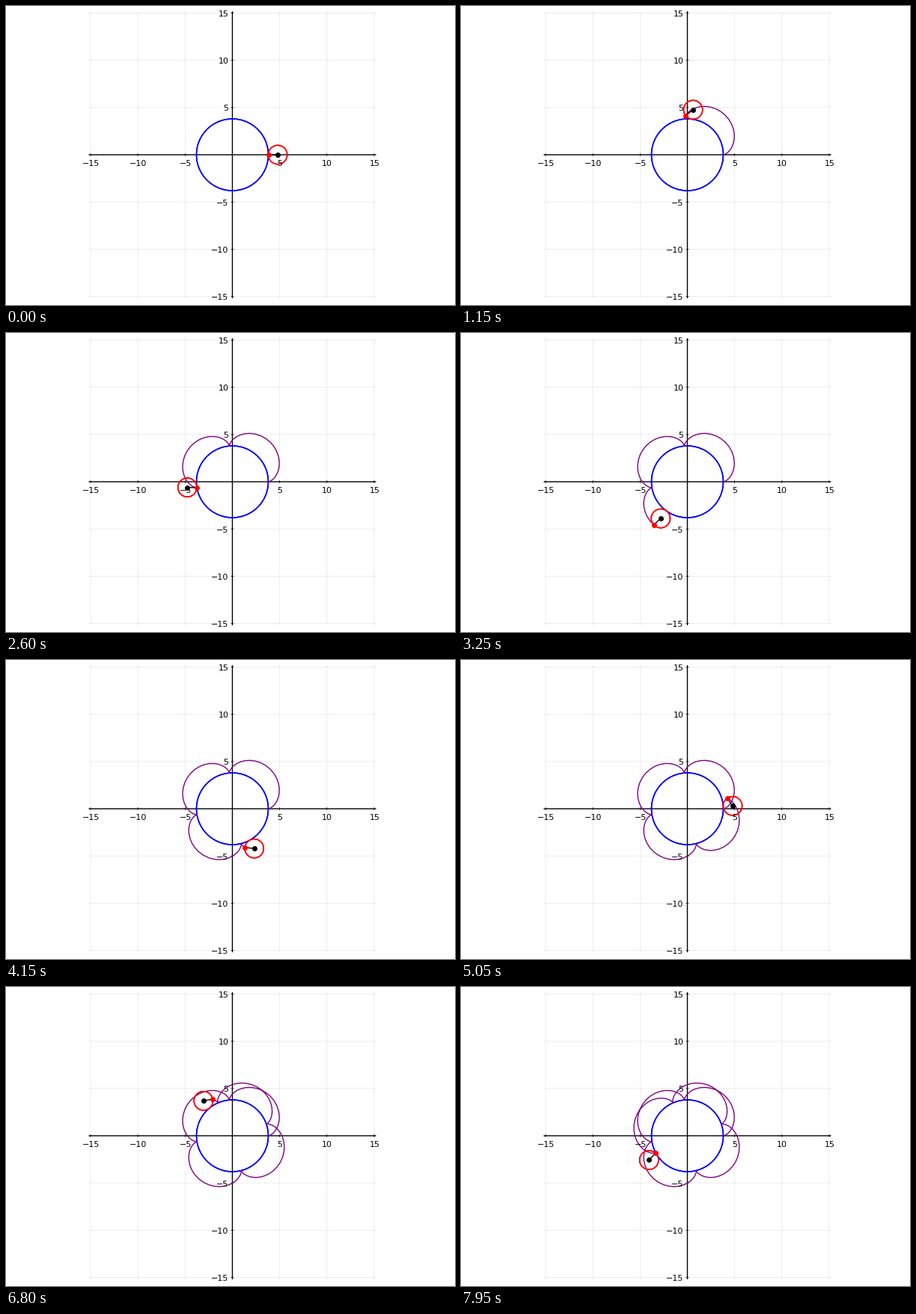
Animation of 600 by 400 pixels, one loop 8000 ms. Source, as a matplotlib script:

```python
import numpy as np
import matplotlib.pyplot as plt
from matplotlib.animation import FuncAnimation

W, H, DPI = 600, 400, 100
FRAMES, STEP_MS = 160, 50
R, r = 3.8, 1.0                 # fixed and rolling radius
LIM = 4 * R
SCALE = 384 / (2 * LIM)         # pixels per unit
CX, CY = 302.5, 199.0           # origin, in pixels from the top left
STEP = 2 * np.pi / 100          # angle per frame

plt.rcParams["font.family"] = "DejaVu Sans"


def pt(px):
    return px * 72 / DPI


def center(t):
    return (R + r) * np.cos(t), (R + r) * np.sin(t)


def pen(t):
    k = (R + r) / r
    x, y = center(t)
    return x - r * np.cos(k * t), y - r * np.sin(k * t)


fig = plt.figure(figsize=(W / DPI, H / DPI), dpi=DPI, facecolor="white")
ax = fig.add_axes([0, 0, 1, 1])
ax.set_xlim(-CX / SCALE, (W - CX) / SCALE)
ax.set_ylim((CY - H) / SCALE, CY / SCALE)
ax.axis("off")


def line(xs, ys, color, width=1.39, **kw):
    return ax.plot(xs, ys, color=color, lw=pt(width), snap=False, **kw)[0]


def dot(color):
    return ax.plot([], [], "o", color=color, ms=pt(7), mew=0, snap=False)[0]


def label(x, y, v, ha):
    ax.text(x, y, f"{v}".replace("-", "\u2212"), fontsize=8, ha=ha, va="baseline")


ticks = [v for v in range(-15, 16, 5) if v]
for v in ticks:
    line([v, v], [-LIM, LIM], "black", 0.7, alpha=0.1, solid_capstyle="butt")
    line([-LIM, LIM], [v, v], "black", 0.7, alpha=0.1, solid_capstyle="butt")

line([-LIM, LIM], [0, 0], "black", solid_capstyle="butt")
line([0, 0], [-LIM, LIM], "black", solid_capstyle="butt")

tick = 1.9 / SCALE
for v in ticks:
    line([v, v], [-tick, tick], "black", 0.7, solid_capstyle="butt")
    line([-tick, tick], [v, v], "black", 0.7, solid_capstyle="butt")
    label(v + 0.5 / SCALE, -15 / SCALE, v, "center")
    label(-5 / SCALE, v - 4.5 / SCALE, v, "right")

# Overlaid strokes give the circles their firm edge
turn = np.linspace(0, 2 * np.pi, 201)
ring_x, ring_y = np.cos(turn), np.sin(turn)
for _ in range(3):
    line(R * ring_x, R * ring_y, "blue")
trace = line([], [], "purple")
wheel = [line([], [], "red") for _ in range(3)]
arm = line([], [], "black")
hub = dot("black")
tip = dot("red")


def draw(i):
    t = i * STEP
    cx, cy = center(t)
    px, py = pen(t)
    trace.set_data(*pen(np.arange(i + 1) * STEP))
    for ring in wheel:
        ring.set_data(cx + r * ring_x, cy + r * ring_y)
    arm.set_data([cx, px], [cy, py])
    hub.set_data([cx], [cy])
    tip.set_data([px], [py])
    return [trace, *wheel, arm, hub, tip]


anim = FuncAnimation(fig, draw, frames=FRAMES, interval=STEP_MS,
                     init_func=lambda: draw(0), repeat=True, repeat_delay=0)
plt.show()
```
